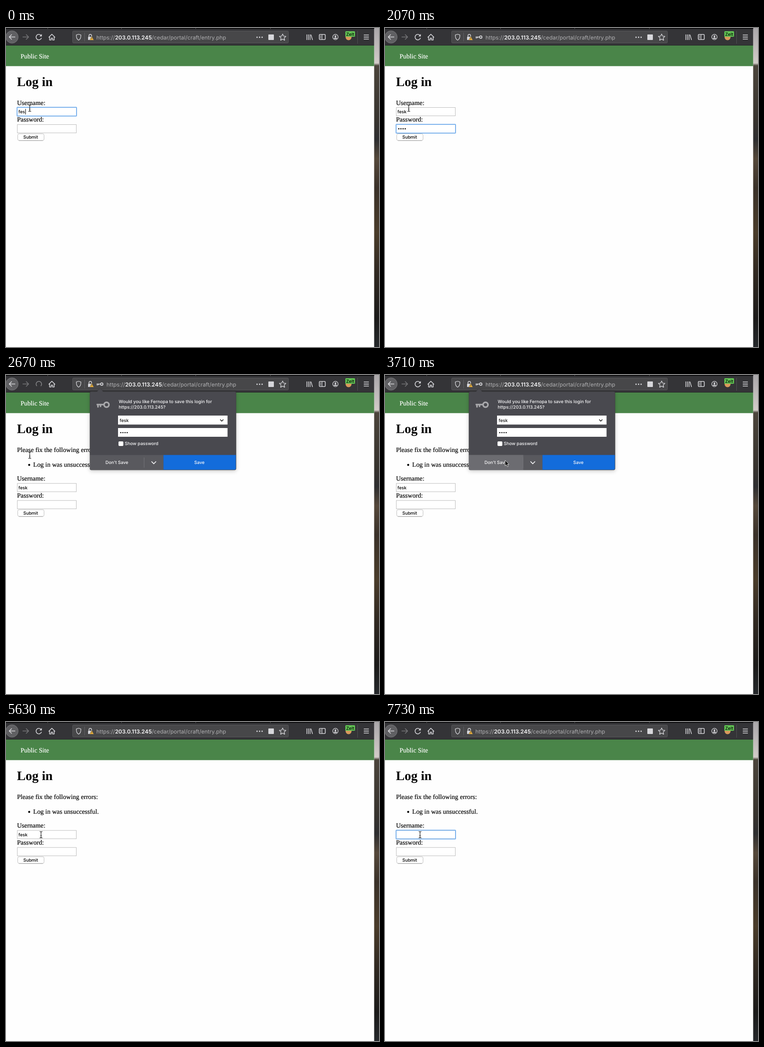
Animation, 809 px wide and 692 px high, one loop 8 s. Source, as an HTML page:

```html
<!DOCTYPE html>
<html lang="en">
<head>
<meta charset="utf-8">
<title>Log in</title>
<style>
  html, body { margin: 0; width: 100%; height: 100%; overflow: hidden; background: #fefefe; }
  svg { display: block; width: 100vw; height: 100vh; }
  text { white-space: pre; text-rendering: geometricPrecision; }
  .page { font: 14.17px "Liberation Serif", serif; }
  .page text, text.page { stroke: currentColor; stroke-width: .2; }
  .title { font: bold 28.2px "Liberation Serif", serif; }
  .ui { font: 500 9.6px Inter, sans-serif; }
  .address { font: 11.9px Inter, sans-serif; fill: #b1b1b3; }
  .host { font-weight: 600; fill: #f9f9fa; }
  .mid { text-anchor: middle; }
  .icon { fill: none; stroke: #d7d7db; stroke-width: 1.6; stroke-linejoin: round; }
  .box { fill: #fff; stroke: #bdbdbd; }
  .ring { fill: none; stroke: #7ab1ec; stroke-width: 2; }
  .dots { fill: none; stroke: #000; stroke-width: 2.7; stroke-linecap: round; stroke-dasharray: 0 4.6; }
</style>
</head>
<body>
<svg viewBox="0 0 809 692" preserveAspectRatio="none">
  <defs>
    <linearGradient id="hills" x2="0" y2="1">
      <stop offset="0" stop-color="#aaa7aa"/>
      <stop offset=".11" stop-color="#d2cbc8"/>
      <stop offset=".118" stop-color="#4b443b"/>
      <stop offset=".29" stop-color="#37332e"/>
      <stop offset=".35" stop-color="#2e2e30"/>
      <stop offset=".41" stop-color="#55483a"/>
      <stop offset=".5" stop-color="#3a3129"/>
      <stop offset=".64" stop-color="#4a3c2a"/>
      <stop offset=".76" stop-color="#322a22"/>
      <stop offset=".91" stop-color="#1b1a19"/>
      <stop offset="1" stop-color="#25282b"/>
    </linearGradient>
    <filter id="shadow" x="-10%" y="-10%" width="120%" height="130%">
      <feDropShadow dx="0" dy="2" stdDeviation="4" flood-opacity=".22"/>
    </filter>
  </defs>

  <!-- desktop and page -->
  <rect x="798" width="11" height="692" fill="url(#hills)"/>
  <rect width="798.5" height="692" fill="#fefefe"/>
  <rect y="38" width="798.5" height="44.7" fill="#4a8549"/>
  <text class="page" x="31.5" y="66" fill="#fff" color="#fff">Public Site</text>
  <text class="title" x="23.7" y="125.5">Log in</text>

  <g id="errors" class="page">
    <text x="24" y="167">Please fix the following errors:</text>
    <circle cx="50.3" cy="195" r="2.2"/>
    <text x="59" y="198.5">Log in was unsuccessful.</text>
  </g>

  <g id="form">
    <text class="page" x="24" y="166.7">Username:</text>
    <rect class="box" x="24.5" y="172.5" width="128" height="18"/>
    <text id="user" class="ui" x="27" y="185"/>
    <text class="page" x="24" y="203.2">Password:</text>
    <rect class="box" x="24.5" y="209.5" width="128" height="18"/>
    <path id="pass" class="dots"/>
    <rect id="ring" class="ring" x="24" width="129" height="19" rx="1"/>
    <rect id="caret" width="1" height="12"/>
    <rect x="25.5" y="229.5" width="57" height="14.5" rx="3" class="box"/>
    <path d="M28 244.3h52" stroke="#a9a9a9"/>
    <text class="ui mid" x="53.5" y="240">Submit</text>
  </g>

  <!-- suggestions under the user field -->
  <g id="suggest" class="ui">
    <rect id="suggestBox" x="23.5" y="255.5" width="131" fill="#fff" stroke="#c4c4c6"/>
    <text id="suggestName" x="30" y="276">fbardon47</text>
    <text id="suggestAll" x="30">View Saved Logins</text>
  </g>

  <!-- toolbar -->
  <rect width="798.5" height="38" fill="#343437"/>
  <rect width="798.5" height="2" fill="#0d0d0e"/>
  <path d="M90.5 0v2M250.5 0v2M411.5 0v2M573.5 0v2" stroke="#555"/>
  <path d="M0 37.5h798" stroke="#252528"/>
  <rect x="144.5" y="6.5" width="468" height="26" rx="2" fill="#474749" stroke="#59595c"/>
  <circle cx="13" cy="19.5" r="13.5" fill="#606063" stroke="#77777a"/>
  <g class="icon">
    <path d="M20 19.5H7m5.5-5.5L7 19.5l5.5 5.5"/>
    <path d="M36 19.5h13m-5.5-5.5 5.5 5.5-5.5 5.5" stroke="#77777a"/>
    <g id="reload">
      <path d="M76 16A6 6 0 1 0 77 21.5"/>
      <path d="M77.7 13v5.2h-5.2z" fill="#d7d7db" stroke="none"/>
    </g>
    <path id="loading" d="M67 24A6 6 0 1 1 75.5 24" stroke="#88888b"/>
    <path d="m92.5 20.5 7-7 7 7M94.5 19v7H98v-4h3v4h3.500v-7"/>
    <path d="m157.5 13.5 5 1.7c.2 6-1.5 9.3-5 11.3-3.5-2-5.2-5.3-5-11.3z" stroke-width="1.3"/>
    <path d="M170.5 10v19" stroke="#626265" stroke-width="1"/>
    <path d="M180 19v-2.5a2.8 2.8 0 0 1 5.6 0V19" stroke-width="1.5"/>
    <rect x="178" y="19" width="9" height="7" rx="1" fill="#d7d7db" stroke="none"/>
    <path d="m186 18 4.5 8.5h-9z" fill="#ffbf3c" stroke="#474749" stroke-width=".7"/>
    <path d="M186 21v2.7m0 .8v1" stroke="#333" stroke-width="1"/>
    <path d="M544.5 20h0M550 20h0M555.5 20h0" stroke-width="3" stroke-linecap="round"/>
    <path d="m600 13 2.1 4.6 5 .6-3.7 3.4 1 5-4.4-2.5-4.4 2.5 1-5-3.7-3.4 5-.6z" stroke-width="1.3"/>
    <path d="M652.5 14v12m3.5-12v12m3.5-12v12M661.5 14.5l3.3 11.5" stroke-width="1.5"/>
    <rect x="679.5" y="14" width="13" height="11" rx="1.5"/>
    <path d="M685.5 14v11M681 17h3m-3 2.5h3m-3 2.5h3" stroke-width="1.2"/>
    <circle cx="714.5" cy="19.5" r="5.8" stroke-width="1.3"/>
    <path d="M711 23.5c0-4 7-4 7 0z" fill="#d7d7db" stroke="none"/>
    <circle cx="714.5" cy="18" r="2" fill="#d7d7db" stroke="none"/>
    <path d="M762.5 6v28" stroke="#505053" stroke-width="1"/>
    <path d="M776 15.2h11m-11 4.4h11m-11 4.4h11"/>
  </g>
  <rect x="569" y="14" width="12" height="12" rx="1" fill="#d7d7db"/>
  <circle cx="743" cy="20" r="6.5" fill="#d99a5c"/>
  <rect x="736" y="7" width="21" height="12" rx="1.5" fill="#62c554"/>
  <text class="ui mid" x="746.5" y="16.5">Zelt</text>
  <g id="keyIcon" fill="none" stroke="#d7d7db">
    <circle cx="207.7" cy="19.7" r="2.6" stroke-width="1.8"/>
    <path d="M205 19.5h-8.5M198 19.5v3.2m3-3.2V22" stroke-width="1.7"/>
  </g>
  <text id="address" class="address" y="24.5">https://<tspan class="host">203.0.113.245</tspan>/cedar/portal/craft/entry.php</text>

  <!-- save-login panel -->
  <g id="panel" class="ui" fill="#f9f9fa">
    <path d="M185 36h12.5l6.5-7.5 6.5 7.5H496a3 3 0 0 1 3 3v164a3 3 0 0 1-3 3H185a3 3 0 0 1-3-3V39a3 3 0 0 1 3-3z" fill="#4a4a4f" stroke="#39393d" stroke-width=".6" filter="url(#shadow)"/>
    <g fill="none" stroke="#a9a9ac">
      <circle cx="218" cy="64.5" r="5.3" stroke-width="3.4"/>
      <path d="M213 64.2h-16.5M199.5 64v6.5m5.5-6.5v5.5" stroke-width="3.2"/>
    </g>
    <text x="244.5" y="60.5">Would you like Fernopa to save this login for</text>
    <text x="244.5" y="73">https://203.0.113.245?</text>
    <rect x="243" y="88" width="237.5" height="19.5" fill="#fff"/>
    <rect x="243" y="115" width="237.5" height="19" fill="#fff"/>
    <text id="panelUser" x="246.5" y="101.5" fill="#111"/>
    <path d="m464.5 96.5 3.5 3.5 3.5-3.5" fill="none" stroke="#222" stroke-width="1.7"/>
    <path id="panelPass" class="dots"/>
    <rect x="244" y="144" width="10.5" height="10" rx="2" fill="#fff"/>
    <text x="257.5" y="152">Show password</text>
    <path d="M182 173.5h159.5V206H185a3 3 0 0 1-3-3z" fill="#59595e"/>
    <path id="hover" d="M182 173.5h118V206H185a3 3 0 0 1-3-3z" fill="#6c6c71"/>
    <path d="M299.5 179v22" stroke="#737378"/>
    <path d="M341.5 173.5h157V203a3 3 0 0 1-3 2.5h-154z" fill="#136cdb"/>
    <path d="m315.5 187.5 5 5 5-5" fill="none" stroke="#f9f9fa" stroke-width="1.7"/>
    <g class="mid">
      <text x="240.5" y="193">Don’t Save</text>
      <text x="419.5" y="193">Save</text>
    </g>
  </g>

  <g id="status" class="ui">
    <path d="M0 684.5h208a3 3 0 0 1 3 3V692H0z" fill="#343437"/>
    <text x="-2" y="696" fill="#f9f9fa">203.0.113.245…</text>
  </g>

  <!-- pointers, both with the hot spot at 0,0 -->
  <path id="arrow" d="M0 0v12l2.8-2.5 2 4.500 2-.9-2-4.300h3.700z" stroke="#fff" stroke-width=".8"/>
  <path id="beam" d="M-3-7q3 0 3 2v10q0 2-3 2M3-7q-3 0-3 2v10q0 2 3 2M-1.5 2h3" fill="none" stroke="#222" stroke-width="1.2"/>
</svg>
<script>
const LOOP = 8000;
const el = {};
document.querySelectorAll('[id]').forEach(node => el[node.id] = node);

const show = (node, on) => node.style.display = on ? '' : 'none';
const move = (node, x, y) => node.setAttribute('transform', `translate(${x} ${y})`);
const within = (t, from, to) => t >= from && t < to;

// Last value whose start time has passed.
const at = (t, track) => track.filter(([start]) => t >= start).pop()[1];

// Eased progress that advances in `count` held steps from `from` to `to`.
function stepped(t, from, to, count) {
  const done = Math.floor((t - from) / (to - from) * (count - 1) + 1e-6) + 1;
  const p = Math.min(1, Math.max(0, done / count));
  return p * p * (3 - 2 * p);
}

const USER = 'fesk';
const userLength = [[0, 3], [140, 4], [6830, 3], [6980, 2], [7130, 1], [7280, 0]];
const passLength = [[0, 0], [1190, 1], [1330, 2], [1630, 3], [1930, 4], [2660, 0]];
const caretOn = [[0, 1], [890, 0], [1190, 1], [2070, 0], [6080, 1], [6530, 0], [6830, 1], [7730, 0]];
const focus = [[0, 'user'], [290, 'pass'], [2660, ''], [6080, 'user']];

function drawDots(node, x, y, count) {
  show(node, count > 0);
  node.setAttribute('d', `M${x} ${y}h${Math.max(0, count - 1) * 4.6 + 0.1}`);
}

function pointer(t) {
  if (t < 2810) return [51.5, 174];
  if (t < 3560) {
    const p = stepped(t, 2810, 3410, 5);
    return [51.5 + 219.5 * p, 174 + 7 * p];
  }
  if (t < 3710) return [264, 183];
  if (t >= 5630) return [76, 244.5];
  const p = stepped(t, 4450, 5480, 8);
  return [260.5 - 185.5 * p, 185 + 54.5 * p];
}

function drawForm(t) {
  const failed = t >= 2660;
  const field = at(t, focus);
  const dots = at(t, passLength);
  show(el.errors, failed);
  move(el.form, 0, failed ? 62.7 : 0);
  el.user.textContent = USER.slice(0, at(t, userLength));
  drawDots(el.pass, 30, 218.7, dots);
  show(el.ring, field);
  show(el.caret, field && at(t, caretOn));
  el.ring.setAttribute('y', field === 'pass' ? 209 : 172);
  const typed = field === 'pass' ? dots * 4.6 : el.user.getComputedTextLength();
  el.caret.setAttribute('x', Math.round(27.7 + typed));
  el.caret.setAttribute('y', field === 'pass' ? 213 : 175.5);
}

function drawSuggestions(t) {
  const matched = t >= 7130;
  show(el.suggest, within(t, 6080, 7430));
  show(el.suggestName, matched);
  el.suggestBox.setAttribute('height', matched ? 59 : 24);
  el.suggestAll.setAttribute('y', matched ? 305 : 271);
}

function drawBrowser(t) {
  const key = within(t, 1190, 4150);
  const busy = within(t, 2370, 2810);
  show(el.keyIcon, key);
  el.address.setAttribute('x', key ? 218 : 196);
  show(el.reload, !busy);
  show(el.loading, busy);
  show(el.status, within(t, 2370, 2660));
}

function drawPanel(t, x) {
  const opening = t < 2520;
  show(el.panel, within(t, 2370, 4150));
  el.panel.setAttribute('opacity', opening ? 0.7 : 1);
  el.panelUser.textContent = opening ? 'fbardon47' : USER;
  drawDots(el.panelPass, 249, 125, opening ? 3 : 4);
  show(el.hover, t >= 2810 && x > 182 && x < 300);
}

function draw(now) {
  const t = now % LOOP;
  const [x, y] = pointer(t);
  const arrow = within(t, 2810, 5630);
  drawForm(t);
  drawSuggestions(t);
  drawBrowser(t);
  drawPanel(t, x);
  show(el.arrow, arrow);
  show(el.beam, !arrow);
  move(arrow ? el.arrow : el.beam, x, y);
}

const start = performance.now();
function frame() {
  draw(performance.now() - start);
  requestAnimationFrame(frame);
}
frame();
</script>
</body>
</html>
```
